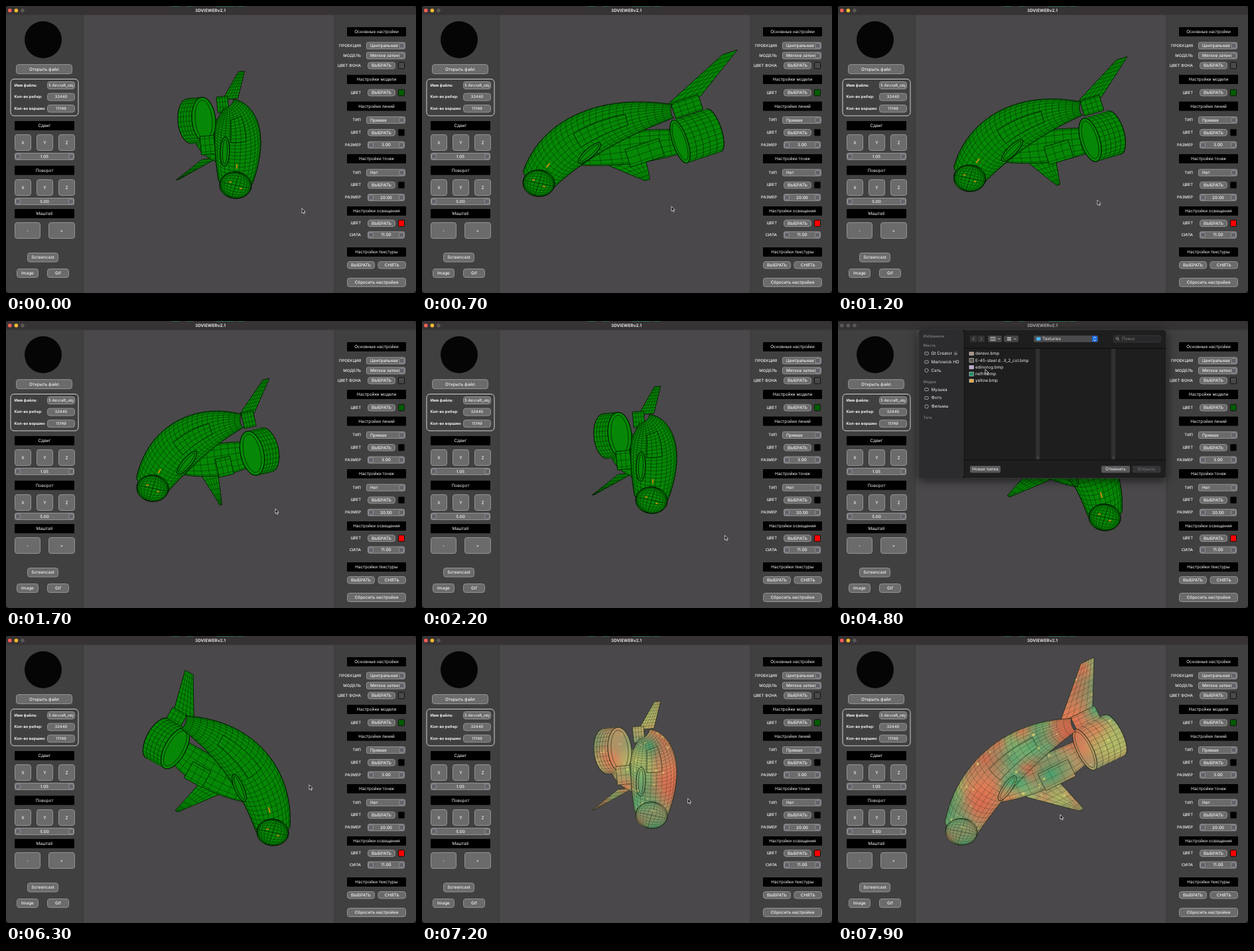
Write an HTML page with a canvas that moves like this. It is 618x434 px and loops after 8 s.

```html
<!DOCTYPE html>
<html lang="ru">
<head>
<meta charset="utf-8">
<title>3D viewer</title>
<style>
html, body { margin: 0; width: 618px; height: 434px; overflow: hidden; background: #151515; }
svg, canvas { position: absolute; left: 0; top: 0; }
text { font-family: Inter, "Open Sans", sans-serif; font-size: 6.4px; fill: #f2f2f2; dominant-baseline: central; text-rendering: geometricPrecision; }
.bold { font-weight: 700; }
.mid { font-weight: 500; }
.dim { fill: #858585; }
.small { font-size: 5.9px; }
#dialog { filter: drop-shadow(0 3px 7px rgba(0, 0, 0, .6)); }
</style>
</head>
<body>
<svg id="ui" width="618" height="434"></svg>
<canvas id="view" width="618" height="434"></canvas>
<svg id="top" width="618" height="434"></svg>
<script>
const LOOP = 8000, STEP = 100;
const $ = id => document.getElementById(id);

// ---------- interface ----------
const box = (x, y, x2, y2, fill, stroke = 'none', r = 0, extra = '') =>
  `<rect x="${x}" y="${y}" width="${x2 - x}" height="${y2 - y}" rx="${r}" fill="${fill}" stroke="${stroke}" ${extra}/>`;
const label = (x, y, s, anchor = 'start', cls = '', extra = '') =>
  `<text x="${x}" y="${y}" text-anchor="${anchor}" class="${cls}" ${extra}>${s}</text>`;
const dot = (x, y, r, fill, extra = '') => `<circle cx="${x}" cy="${y}" r="${r}" fill="${fill}" ${extra}/>`;
const line = (d, color, w = 1) => `<path d="${d}" fill="none" stroke="${color}" stroke-width="${w}"/>`;
const middle = (x, y, x2, y2, s, cls) => label((x + x2) / 2, (y + y2) / 2 + .2, s, 'middle', cls);
const button = (x, y, x2, y2, s, r = 3.5) =>
  box(x + .5, y + .5, x2 - .5, y2 - .5, '#6b6b6b', '#929292', r) + middle(x, y, x2, y2, s, 'mid');
const heading = (x, y, x2, s) => box(x, y, x2, y + 14, '#000', 'none', 1) + middle(x, y, x2, y + 14, s);
const knob = (x, y) => box(x, y, x + 7, y + 7, '#626268', '#9a9aa4', 1.5, 'stroke-width=".8"');
const spin = (x, y, x2, s) => button(x, y, x2, y + 11, s, 2) + knob(x + 1.5, y + 2) + knob(x2 - 8.5, y + 2);

// rows of the right panel, centred on y
const caption = (y, s) => label(535, y, s, 'end', 'mid small');
const rows = {
  select: (y, name, s) => caption(y, name) + button(543, y - 5.5, 602, y + 5.5, '', 2) + label(549, y, s, 'start', 'mid') + knob(593, y - 3.5),
  pick: (y, name, color) => caption(y, name) + button(545, y - 5.3, 587, y + 5.5, 'ВЫБРАТЬ') + box(591.5, y - 4.7, 600.5, y + 4.8, color, '#111', 1),
  spin: (y, name, s) => caption(y, name) + spin(545, y - 5.5, 601, s)
};
const sections = [
  ['Основные настройки', 32, 60, 15, ['select', 'ПРОЕКЦИЯ', 'Центральная'], ['select', 'МОДЕЛЬ', 'Мягкое затене'], ['pick', 'ЦВЕТ ФОНА', '#4b494b']],
  ['Настройки модели', 104, 131, 0, ['pick', 'ЦВЕТ', '#005c00']],
  ['Настройки линий', 144.5, 172.5, 18.8, ['select', 'ТИП', 'Прямая'], ['pick', 'ЦВЕТ', '#000'], ['spin', 'РАЗМЕР', '3.00']],
  ['Настройки точек', 224, 252, 18.8, ['select', 'ТИП', 'Нет'], ['pick', 'ЦВЕТ', '#000'], ['spin', 'РАЗМЕР', '20.00']],
  ['Настройки освещения', 303, 328.5, 17.7, ['pick', 'ЦВЕТ', '#f00'], ['spin', 'СИЛА', '11.00']],
  ['Настройки текстуры', 365, 0, 0]
];
const axes = y => ['X', 'Y', 'Z'].map((s, i) => button(13 + 33 * i, y, 38 + 33 * i, y + 25, s)).join('');

function drawUi() {
  let s = box(0, 0, 618, 434, '#404040', 'none', 5) + box(117, 13, 495, 434, '#4a484a') +
    box(0, 0, 618, 13.5, '#373334', 'none', 4) + line('M116.7 14V434M495 14V434', '#383838', .7) +
    line('M249 .4H262M272 .4H282M317 .4H345M348 .4H359', '#24704a') + dot(56, 51, 28, '#050505');
  s += button(15, 88, 100, 103, 'Открыть файл') + box(7, 110.5, 109, 166, 'none', '#d0d0d0', 5);
  ['Имя файла:', 'Кол-во ребер:', 'Кол-во вершин:'].forEach((name, i) => {
    const y = 114 + 17.6 * i;
    s += label(12.5, y + 6.3, name, 'start', 'bold small') + button(62, y, 104, y + 12, '') +
      middle(62, y, 104, y + 12, ['5 Aircraft_obj', '32440', '11749'][i], 'mid small');
  });
  s += heading(13, 174, 103, 'Сдвиг') + axes(194) + spin(13, 222, 103, '1.05') +
    heading(13, 241.5, 103, 'Поворот') + axes(262) + spin(13, 290, 103, '5.00') +
    heading(13, 307, 103, 'Маштаб') + button(13, 327, 52, 352, '-') + button(64, 327, 104, 352, '+') +
    button(32, 373, 79, 387.5, 'Screencast') + button(16, 397, 49, 411, 'Image') + button(62, 397, 95, 411, 'Gif');
  for (const [title, y, first, gap, ...items] of sections) {
    s += heading(514, y, 603, title);
    items.forEach(([kind, ...rest], i) => s += rows[kind](first + gap * i, ...rest));
  }
  s += button(514, 386, 556, 397.5, 'ВЫБРАТЬ') + button(560.5, 386, 603, 397.5, 'СНЯТЬ') +
    button(514, 411, 603, 425, 'Сбросить настройки');
  s += ['#ff5f57', '#febc2e', '#5b5859'].map((c, i) => dot(5.8 + 9.6 * i, 6.8, 2.8, c, 'class="light"')).join('') +
    label(308, 6.8, '3DVIEWERv2.1', 'middle', 'bold', 'id="title"');
  $('ui').innerHTML = s;
}

function drawDialog() {
  let s = box(121.5, 13, 495, 238, '#1e1e1f', '#48484a', 6, 'stroke-width=".7"') + box(122, 13.5, 190, 237.5, '#2c2b2d', 'none', 5) +
    line('M190.3 13V238', '#111');
  const groups = [['Избранное', 23], ['Места', 37.5, 'Qt Creator', 'Marlowick HD', 'Сеть'], ['Медиа', 92, 'Музыка', 'Фото', 'Фильмы'], ['Теги', 146]];
  for (const [name, y, ...items] of groups) {
    s += label(128.5, y, name, 'start', 'mid dim small');
    items.forEach((t, i) => {
      const iy = y + 11.5 + 12.9 * i;
      s += label(140.5, iy, t) + (i == 2 ? dot(133.5, iy, 2.7, 'none', 'stroke="#bbb" stroke-width=".8"')
        : box(130.7, iy - 2, 136.3, iy + 2, 'none', '#bbb', 1, 'stroke-width=".8"'));
    });
  }
  s += line('M175 49.5L177.3 46.5L179.6 49.5ZM175 51H179.6', '#999', .8) +
    box(199, 22, 209.5, 32, '#333335', 'none', 2) + box(210.5, 22, 221, 32, '#333335', 'none', 2) +
    box(226, 22, 247, 32, '#454547', 'none', 2) + box(250, 22, 272, 32, '#454547', 'none', 2) +
    line('M205.5 24.5L203 27L205.5 29.5M214.5 24.5L217 27L214.5 29.5', '#777') +
    line('M230 24.5H237V29.5H230ZM232.3 24.5V29.5M234.7 24.5V29.5M241 26L242.7 28L244.4 26M265 26L266.7 28L268.4 26', '#ddd', .7) +
    line('M255 25.5H261M255 28.5H261', '#ddd', 1.6) +
    box(295, 22, 392, 32, '#4a4a4c', 'none', 2) + box(299, 24.5, 305.5, 29.5, '#47b5ee', 'none', 1) + label(308, 27, 'Texturies') +
    box(383, 22.5, 391, 31.5, '#1769e0', 'none', 2) + line('M385 26L387 24L389 26M385 28L387 30L389 28', '#fff', .8) +
    box(415.5, 22, 486, 32, '#28282a', '#444', 2, 'stroke-width=".6"') + label(428, 27, 'Поиск', 'start', 'dim') +
    dot(421, 26.4, 1.8, 'none', 'stroke="#aaa" stroke-width=".8"') + line('M422.3 27.8L424 29.5', '#aaa', .8) +
    line('M190 41.3H495M190 210H495', '#0c0c0c') + box(193, 75, 297, 85, '#1459c7', 'none', 2, 'id="pickRow"');
  for (const x of [298, 412]) s += box(x, 42, x + 6.3, 209.5, '#303032') + line(`M${x + 2.3} 205v3m1.7 0v-3`, '#666', .6);
  [['derevo.bmp', '#a98f80'], ['E-45-steel d...ll_2_col.bmp', '#5d5753'], ['edinorog.bmp', '#c3a9d8'], ['nefrit.bmp', '#1d9268'], ['yellow.bmp', '#e8a63c']]
    .forEach(([t, c], i) => {
      const y = 49.4 + 10.25 * i, h = i % 2 ? 3 : 2.4;
      s += box(198, y - h, 204.3, y + h, c, '#ddd', 0, 'stroke-width=".6"') + label(207, y, t);
    });
  s += box(199, 219, 245, 229.5, '#58585a', 'none', 2) + middle(199, 219, 245, 229, 'Новая папка') +
    box(397, 219, 440, 229.5, '#58585a', 'none', 2) + middle(397, 219, 440, 229, 'Отменить') +
    box(444, 219, 486.5, 229.5, '#343436', 'none', 2, 'id="openBtn"') + label(465, 224.2, 'Открыть', 'middle', '', 'id="openText"');
  $('top').innerHTML = `<g id="dialog">${s}</g>
    <path id="cursor" d="M0 0V7.2L1.7 5.8L2.9 8.4L4.1 7.8L2.9 5.3H5.1Z" fill="#111" stroke="#fff" stroke-width=".7"/>`;
}

// ---------- motion ----------
// A pose is six points: nose, tail, fin tip, wing tip, engine front, engine back.
const front = [[346, 264], [335, 148], [355, 99], [258, 263], [298, 172], [277, 174]];
const broadside = [[176, 261], [379, 159], [464, 70], [340, 263], [389, 205], [440, 188]];
const quarter = [[221, 246], [357, 151], [392, 88], [324, 278], [371, 200], [393, 195]];
const starboard = [[402, 290], [267, 130], [276, 55], [257, 265], [255, 170], [228, 155]];
const port = [[186, 289], [356, 134], [376, 37], [367, 263], [372, 172], [417, 150]];
const poses = [[0, front], [700, broadside], [1700, quarter], [2200, front], [2700, starboard],
  [6600, starboard], [7200, front], [7900, port]];
const mouse = [[0, [446, 306]], [700, [376, 303]], [1700, [406, 284]], [3100, [547, 396]], [3700, [547, 396]],
  [4800, [222, 73]], [5000, [222, 78]], [5400, [424, 250]], [5700, [457, 225]], [6600, [457, 225]], [7900, [335, 270]]];

const lerp = (a, b, f) => a + (b - a) * f;
const mix = (a, b, f) => a.map((v, i) => Array.isArray(v) ? mix(v, b[i], f) : lerp(v, b[i], f));
const add = (p, d, k = 1) => [p[0] + d[0] * k, p[1] + d[1] * k];
const sub = (p, q) => add(p, q, -1);
function at(track, t) {
  const i = track.findLastIndex(k => k[0] <= t), [t0, a] = track[i], next = track[i + 1];
  return next ? mix(a, next[1], (t - t0) / (next[0] - t0)) : a;
}

// ---------- ship ----------
const ctx = $('view').getContext('2d');
const GREEN = '#068806', TILE = 170, PIVOT = [307, 231];
let edge, mesh;

function makeTexture() {
  const c = document.createElement('canvas'), g = c.getContext('2d');
  c.width = c.height = TILE;
  let seed = 11;
  const rnd = () => (seed = seed * 16807 % 2147483647) / 2147483647;
  const blob = (r, color) => {
    const x = rnd() * TILE, y = rnd() * TILE;
    for (const dx of [-TILE, 0, TILE]) for (const dy of [-TILE, 0, TILE]) {
      const grad = g.createRadialGradient(x + dx, y + dy, 0, x + dx, y + dy, r);
      grad.addColorStop(0, `rgba(${color},.95)`);
      grad.addColorStop(1, `rgba(${color},0)`);
      g.fillStyle = grad;
      g.fillRect(0, 0, TILE, TILE);
    }
  };
  g.fillStyle = '#7fa572';
  g.fillRect(0, 0, TILE, TILE);
  const tones = ['220,108,80', '62,166,112', '226,128,88', '178,186,104'];
  for (let i = 0; i < 36; i++) blob(20 + rnd() * 28, tones[i % 4]);
  for (let i = 0; i < 60; i++) blob(1 + rnd() * 2.2, '240,224,120');
  return ctx.createPattern(c, 'repeat');
}
const texture = makeTexture();

function stroke(w, style = edge) {
  ctx.lineWidth = w;
  ctx.strokeStyle = style;
  ctx.stroke();
}
const paint = (w = 1) => { ctx.fill(); stroke(w); };
function trace(fn, n) {
  for (let i = 0; i <= n; i++) ctx.lineTo(...fn(i / n));
}

// Fills the image of the unit square under f(u, v) and rules it into cells.
function surface(f, nu, nv) {
  ctx.beginPath();
  trace(v => f(0, v), 10);
  trace(u => f(u, 1), 24);
  trace(v => f(1, 1 - v), 10);
  trace(u => f(1 - u, 0), 24);
  ctx.closePath();
  paint();
  ctx.beginPath();
  for (let i = 1; i < nu; i++) { ctx.moveTo(...f(i / nu, 0)); trace(v => f(i / nu, v), 10); }
  for (let j = 1; j < nv; j++) { ctx.moveTo(...f(0, j / nv)); trace(u => f(u, j / nv), 24); }
  stroke(.6, mesh);
}
const bezier = (a, c, b) => u => mix(mix(a, c, u), mix(c, b, u), u);
function heading2d(spine, u) {
  const d = sub(spine(u + .01), spine(u - .01)), n = Math.hypot(...d) || 1;
  return [d[0] / n, d[1] / n];
}
// Round body along a spine; rings bow towards the spine's start.
const body = (spine, radius, bow = .4) => (u, v) => {
  const [dx, dy] = heading2d(spine, u), r = radius(u), w = (v - .5) * Math.PI;
  return add(add(spine(u), [-dy, dx], r * Math.sin(w)), [dx, dy], -bow * r * Math.cos(w));
};
const rod = (a, b, r) => body(bezier(a, mix(a, b, .5), b), () => r, 0);
const blade = (root, tip, chord, taper) => (u, v) =>
  add(mix(root, tip, u), chord, (v * 2 - 1) * lerp(.55, taper, u));
function oval([x, y], a, b, angle) {
  ctx.beginPath();
  ctx.ellipse(x, y, a, b, angle, 0, 2 * Math.PI);
}

function engine(from, to) {
  const axis = sub(to, from), a = 34, b = Math.max(10, 22 - .2 * Math.hypot(...axis));
  const angle = Math.atan2(axis[1], axis[0]) + Math.PI / 2;
  for (let i = 0; i <= 30; i++) {
    oval(mix(to, from, i / 30), a, b, angle);
    if (i % 6) ctx.fill(); else paint(i ? .6 : 1.3);
  }
  ctx.beginPath();
  for (let w = 0; w > -Math.PI; w -= Math.PI / 14) {
    const x = a * Math.cos(w), y = b * Math.sin(w), c = Math.cos(angle), s = Math.sin(angle);
    const rim = [x * c - y * s, x * s + y * c];
    ctx.moveTo(...add(to, rim));
    ctx.lineTo(...add(from, rim));
  }
  stroke(.6, mesh);
  oval(from, a, b, angle);
  paint(1.2);
  oval(from, a * .87, b * .72, angle);
  stroke(.8);
}
function ball(p, rx, ry) {
  oval(p, rx, ry, 0);
  paint();
  for (let i = 0; i < 6; i++) {
    const k = Math.sin(i * Math.PI / 12);
    oval(p, rx * k, ry, .3); stroke(.6, mesh);
    oval(p, rx, ry * k, .2); stroke(.6, mesh);
  }
}

function drawShip(t) {
  const [nose, tail, finTip, wingTip, inlet, outlet] = at(poses, t), textured = t >= 6400;
  ctx.clearRect(0, 0, 618, 434);
  ctx.lineJoin = 'round';
  edge = textured ? 'rgba(28,42,24,.75)' : 'rgba(0,20,0,.9)';
  mesh = textured ? 'rgba(28,42,24,.5)' : 'rgba(0,20,0,.72)';
  if (textured) texture.setTransform(new DOMMatrix().translate(...nose).rotate(-40));
  ctx.fillStyle = textured ? texture : GREEN;

  const chord = sub(outlet, inlet);
  const crown = add(mix(nose, tail, .5), [.3 * (nose[0] - tail[0]) + 12, -36]);
  const spine = bezier(nose, crown, tail);
  const hull = body(spine, u => 35 - 63 * (u - .37) ** 2);
  const flank = bezier(spine(.2), add(PIVOT, [0, -16]), inlet);
  const pod = mix(PIVOT, inlet, .35), chin = add(nose, [0, 7]);

  surface(blade(mix(tail, finTip, .15), finTip, chord, .22), 9, 5);
  surface(rod(tail, add(tail, chord, .8), 12), 4, 5);
  surface(blade(PIVOT, wingTip, chord, .07), 6, 5);
  surface(body(flank, u => 24 - 40 * (u - .6) ** 2, .1), 12, 7);
  engine(inlet, outlet);
  surface(hull, 26, 13);
  surface(rod(add(pod, chord, -.5), add(pod, chord, .5), 14), 3, 4);
  surface((u, v) => hull(lerp(.46, .78, u), lerp(.4, .62, v)), 7, 3);

  const [dx, dy] = heading2d(spine, .25), slant = Math.atan2(dy, dx);
  oval(flank(.25), 22, 7, slant);
  paint(1.2);
  oval(flank(.25), 19, 3.5, slant);
  stroke(.9);
  ball(chin, 24, 20);
  if (textured) return;

  ctx.beginPath();
  ctx.moveTo(...spine(.1));
  ctx.lineTo(...spine(.14));
  for (const k of [-1, 1]) {
    const [x, y] = add(chin, [8, 5], k);
    ctx.moveTo(x - 2, y - .5);
    ctx.lineTo(x + 2, y + .5);
  }
  stroke(1.7, '#dc8a08');
}

// ---------- playback ----------
drawUi();
drawDialog();
const lights = [...document.querySelectorAll('.light')], lightColors = lights.map(l => l.getAttribute('fill'));
let shown = -1;

function frame() {
  const t = Math.floor(performance.now() % LOOP / STEP) * STEP;
  if (t !== shown) {
    shown = t;
    const inactive = t >= 3600 && t < 6300, chosen = t >= 5000;
    drawShip(t);
    lights.forEach((l, i) => l.setAttribute('fill', inactive ? '#5b5859' : lightColors[i]));
    $('title').style.fill = inactive ? '#b5b3b4' : '#e4e2e3';
    $('dialog').style.display = t >= 3600 && t < 6000 ? '' : 'none';
    $('pickRow').style.display = chosen ? '' : 'none';
    $('openBtn').style.fill = chosen ? '#1769e0' : '#343436';
    $('openText').style.fill = chosen ? '#fff' : '#77777a';
    $('cursor').setAttribute('transform', `translate(${at(mouse, t)})`);
  }
  requestAnimationFrame(frame);
}
frame();
</script>
</body>
</html>
```
